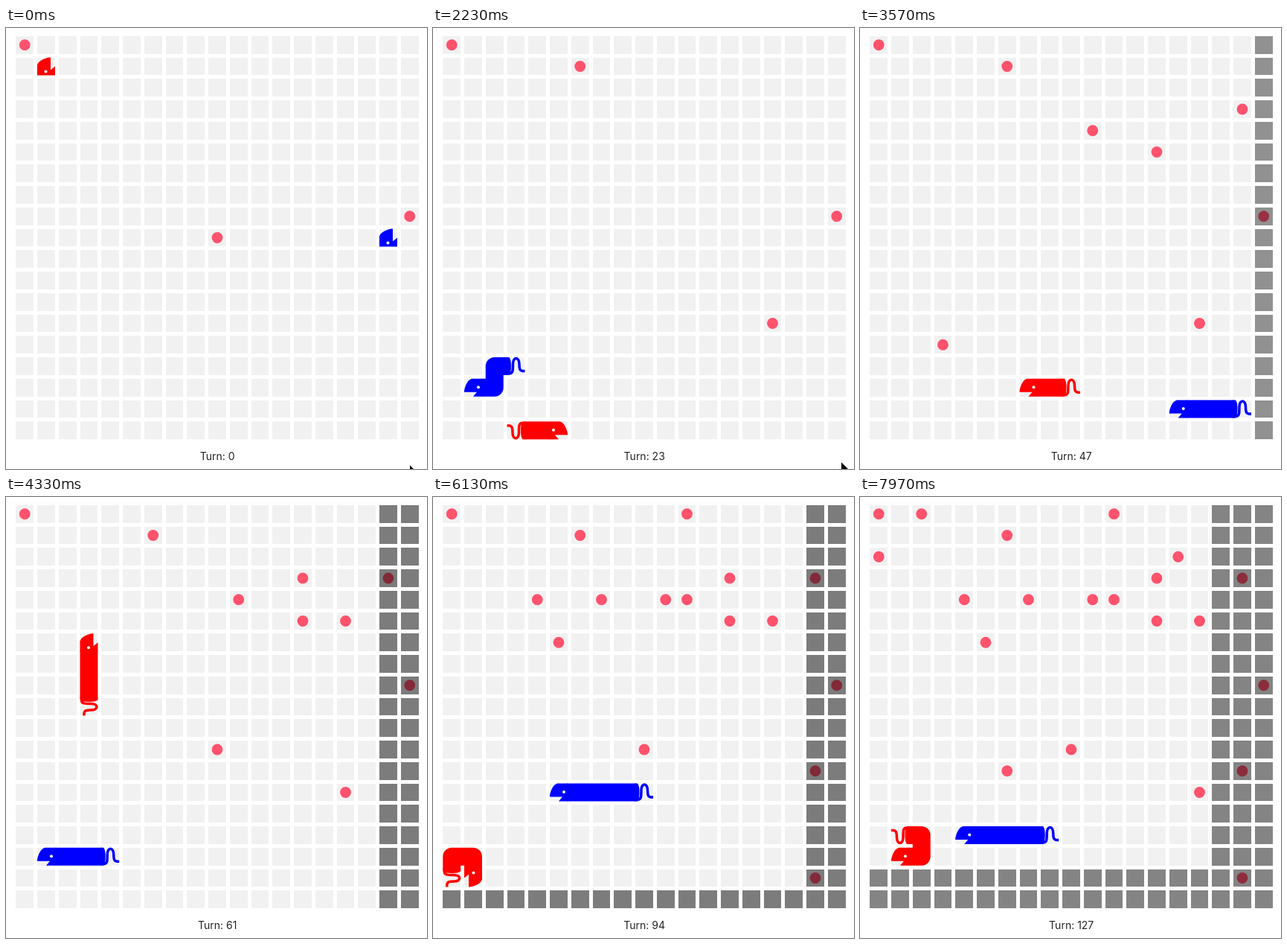
An HTML page with a canvas for the animation above (8 s loop, 566 by 592 pixels).

```html
<!DOCTYPE html>
<html>
<head>
<meta charset="utf-8">
<style>
html, body { margin: 0; width: 566px; height: 592px; overflow: hidden; background: #fff; }
canvas { display: block; }
</style>
</head>
<body>
<canvas id="stage" width="566" height="592"></canvas>
<script>
const ctx = document.getElementById('stage').getContext('2d');
const LOOP = 8000, START = 1000, TURN_MS = 55.1, LAST_TURN = 127;
const SIZE = 19, PITCH = 28.75, CELL = PITCH * 5 / 6, SHRINK_EVERY = 25;
const STEP = { L: [-1, 0], R: [1, 0], U: [0, -1], D: [0, 1] };
const corner = ([c, r]) => [13.25 + PITCH * c, 10.75 + PITCH * r];
const center = cell => corner(cell).map(v => v + CELL / 2);
const minus = (a, b) => [a[0] - b[0], a[1] - b[1]];
const same = (a, b) => a[0] === b[0] && a[1] === b[1];
const clamp = (v, lo, hi) => Math.max(lo, Math.min(hi, v));

// Expands moves such as "L4U" into one position per turn.
function walk(start, moves) {
  const cells = [start];
  for (const [, way, count] of moves.matchAll(/([LRUD])(\d*)/g))
    for (let n = count || 1; n > 0; n--)
      cells.push(cells[cells.length - 1].map((v, i) => v + STEP[way][i]));
  return cells;
}

const snakes = [
  { color: '#f00', cells: walk([1, 1], 'L D17 R17 U2 L14 U10 L D10 LDL' +
    'URDL'.repeat(6) + 'URD LURU3 LD2 R2D' + 'LURD'.repeat(3) + 'L') },
  { color: '#00f', cells: walk([17, 9],
    'L8 D6 L7 DLD R17 ULD L3 U L14 D2 R15 U5 L13 D3 R14 U L12') }
];

// Three pieces lie there at first, the others follow at a steady pace.
const food = [
  [0, 0], [18, 8], [9, 9], [6, 1], [15, 13], [10, 4], [3, 14], [17, 3],
  [13, 5], [9, 11], [13, 3], [15, 5], [11, 0], [4, 4], [17, 12], [7, 4],
  [11, 4], [5, 6], [17, 17], [6, 12], [2, 0], [15, 13], [0, 2], [14, 2]
].map((cell, n) => ({ cell, born: n < 3 ? 0 : 0.3 + 5.2 * n, eaten: Infinity }));

for (const snake of snakes) {
  snake.meals = [];
  snake.cells.forEach((head, turn) => {
    const meal = food.find(f => same(f.cell, head) && turn >= f.born && turn < f.eaten);
    if (meal) snake.meals.push(meal.eaten = turn);
  });
}

const headShape = new Path2D('M-12,-12 H2 C7,-10 10,-5 12,4 V6 H-5 L0,12 H-12Z');
const tailBlock = new Path2D('M13,-12 H9 Q6.5,-9 6.5,0 Q6.5,9 9,12 H13Z');
const tailCurl = new Path2D('M-12,-6.5 H-9 C-5,-6 -4.5,-3 -4.5,3 C-4.5,13 4,13 4,3 C4,-6 4,-10 9,-10');
const pointer = new Path2D('M0,0 V15 L3.5,12 L6,18 L9,17 L6.5,11 H11Z');

function place([x, y], [dx, dy], mirror, paint) {
  ctx.save();
  ctx.translate(x, y);
  if (mirror && dx < 0) ctx.scale(-1, 1);
  else ctx.rotate(Math.atan2(dy, dx));
  paint();
  ctx.restore();
}

function circle(x, y, r, color) {
  ctx.fillStyle = color;
  ctx.beginPath();
  ctx.arc(x, y, r, 0, 2 * Math.PI);
  ctx.fill();
}

// Cell edges snap to whole pixels.
function fillCells(color, wanted) {
  ctx.fillStyle = color;
  for (let r = 0; r < SIZE; r++)
    for (let c = 0; c < SIZE; c++) {
      if (!wanted(c, r)) continue;
      const [x, y] = corner([c, r]);
      const [x0, y0, x1, y1] = [x, y, x + CELL, y + CELL].map(Math.round);
      ctx.fillRect(x0, y0, x1 - x0, y1 - y0);
    }
}

function drawSnake({ color, meals, cells }, turn) {
  const length = 3 + meals.filter(m => turn > m).length;
  const body = cells.slice(Math.max(0, turn - length + 1), turn + 1).reverse();
  const points = body.map(center), last = body.length - 1;
  const facing = last ? minus(body[0], body[1]) : STEP.U;
  ctx.strokeStyle = ctx.fillStyle = color;
  if (last) {
    const tailDir = minus(body[last - 1], body[last]);
    place(points[last], tailDir, false, () => {
      ctx.lineWidth = 3.5;
      ctx.stroke(tailCurl);
      ctx.fill(tailBlock);
    });
    const line = points.slice();
    line[0] = points[0].map((v, i) => v - 11 * facing[i]);
    line[last] = points[last].map((v, i) => v + 11 * tailDir[i]);
    ctx.lineWidth = CELL;
    ctx.lineJoin = 'round';
    ctx.beginPath();
    line.forEach(p => ctx.lineTo(...p));
    ctx.stroke();
  }
  place(points[0], facing, true, () => {
    ctx.fill(headShape);
    circle(-7, -0.5, 2, '#fff');
  });
}

function drawHazards(turn) {
  const stage = Math.floor(turn / SHRINK_EVERY);
  const columns = Math.min(stage, 2) + (stage > 4), rows = clamp(stage - 2, 0, 2);
  const alpha = stage < 2 ? 0.4 : stage < 5 ? 0.485 : 0.455;
  fillCells(`rgba(0,0,0,${alpha})`, (c, r) => c >= SIZE - columns || r >= SIZE - rows);
}

// The pointer nudges up once, then slides off the stage.
function drawPointer(t) {
  const nudge = clamp((t - 430) / 200, 0, 1), exit = clamp((t - 2350) / 250, 0, 1);
  ctx.save();
  ctx.translate(543 + 6 * nudge + 8 * exit, 587 - 4 * nudge + 12 * exit);
  ctx.strokeStyle = '#fff';
  ctx.lineWidth = 2;
  ctx.stroke(pointer);
  ctx.fillStyle = '#000';
  ctx.fill(pointer);
  ctx.restore();
}

function draw() {
  const t = performance.now() % LOOP;
  const turn = clamp(1 + Math.floor((t - START) / TURN_MS), 0, LAST_TURN);
  ctx.fillStyle = '#fff';
  ctx.fillRect(0, 0, 566, 592);
  fillCells('#f1f1f1', () => true);
  for (const { cell, born, eaten } of food)
    if (turn >= born && turn < eaten) circle(...center(cell), 7.4, '#ff526d');
  for (const snake of snakes) drawSnake(snake, turn);
  drawHazards(turn);
  ctx.fillStyle = '#222';
  ctx.font = '14px Inter, sans-serif';
  ctx.textAlign = 'center';
  ctx.fillText('Turn: ' + turn, 284.2, 580);
  drawPointer(t);
  requestAnimationFrame(draw);
}
draw();
</script>
</body>
</html>
```
